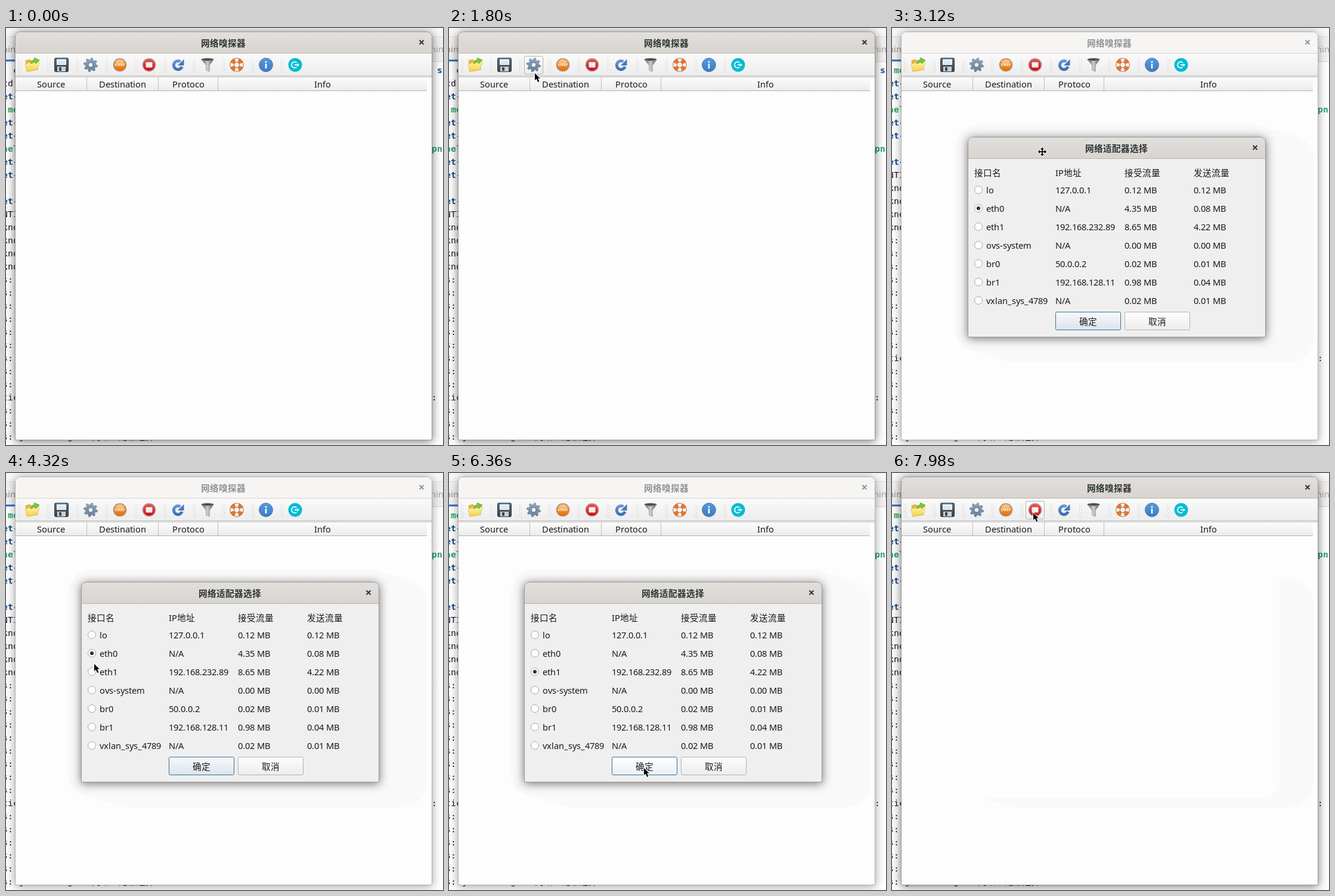
Recreate the animation shown at these times as an HTML page with a canvas. Size 733 by 701 pixels, loop 8000 ms.

```html
<!DOCTYPE html>
<html lang="zh-CN">
<head>
<meta charset="utf-8">
<title>网络嗅探器</title>
<style>
html, body { margin: 0; width: 100%; height: 100%; overflow: hidden; background: #fff; }
canvas { display: block; width: 733px; height: 701px; }
</style>
</head>
<body>
<canvas id="stage"></canvas>
<script>
const W = 733, H = 701, LOOP = 8000, STEP = 60;
const canvas = document.getElementById('stage');
const dpr = window.devicePixelRatio || 1;
canvas.width = Math.round(W * dpr);
canvas.height = Math.round(H * dpr);
const c = canvas.getContext('2d');

const UI = '14.67px "Noto Sans", "Noto Sans CJK SC", sans-serif';
const BOLD = 'bold ' + UI;
const MONO = '14.67px "DejaVu Sans Mono", "Noto Sans CJK SC", monospace';

// Moments in ms
const PRESS = 2160, OPEN = 2220, GRAB = 2940, DROP = 3300, PICK = 5340, CONFIRM = 6600, CLOSE = 6660;

// Pointer stops: time, x, y
const PATH = [
  [180, 724, 8], [360, 563, 125], [480, 459, 149], [600, 344, 152], [840, 239, 138],
  [960, 160, 146], [1140, 139, 112], [1440, 146, 42], [1800, 144, 76], [1860, 144, 76],
  [1980, 144, 65], [2280, 144, 65], [2700, 290, 215], [GRAB, 310, 225], [3060, 258, 209],
  [3120, 252, 208], [3180, 251, 208], [DROP, 251, 208], [3600, 172, 264], [3780, 145, 298],
  [4200, 146, 312], [4320, 148, 321], [4680, 143, 402], [4860, 143, 398], [5040, 143, 398],
  [5280, 144, 335], [5640, 144, 335], [6180, 350, 512], [6360, 327, 496], [CLOSE, 327, 496],
  [7380, 187, 76], [7620, 189, 66], [7800, 300, 75], [7980, 237, 67]
];

function cursorAt(t) {
  const i = PATH.findIndex(p => p[0] > t);
  if (i === 0) return null;
  if (i < 0) return PATH[PATH.length - 1].slice(1);
  const a = PATH[i - 1], b = PATH[i], k = (t - a[0]) / (b[0] - a[0]);
  return [1, 2].map(n => Math.round(a[n] + (b[n] - a[n]) * k));
}

function dialogAt(t) {
  const [x, y] = cursorAt(Math.max(GRAB, Math.min(t, DROP)));
  return [x - 125, y - 25];
}

// ---- helpers ----
function box(x, y, w, h, fill) {
  c.fillStyle = fill;
  c.fillRect(x, y, w, h);
}
function round(x, y, w, h, r, fill, line) {
  c.beginPath();
  c.roundRect(x, y, w, h, r);
  if (fill) { c.fillStyle = fill; c.fill(); }
  if (line) { c.strokeStyle = line; c.lineWidth = 1; c.stroke(); }
}
function disc(x, y, r, fill, line, width = 1) {
  c.beginPath();
  c.arc(x, y, r, 0, 7);
  if (fill) { c.fillStyle = fill; c.fill(); }
  if (line) { c.strokeStyle = line; c.lineWidth = width; c.stroke(); }
}
function oval(x, y, rx, ry, fill) {
  c.beginPath();
  c.ellipse(x, y, rx, ry, 0, 0, 7);
  c.fillStyle = fill;
  c.fill();
}
function poly(points, fill, line, width = 1) {
  c.beginPath();
  points.forEach(p => c.lineTo(p[0], p[1]));
  c.closePath();
  if (line) { c.strokeStyle = line; c.lineWidth = width; c.lineJoin = 'round'; c.stroke(); }
  if (fill) { c.fillStyle = fill; c.fill(); }
}
function fade(y0, y1, ...colors) {
  const g = c.createLinearGradient(0, y0, 0, y1);
  colors.forEach((v, i) => g.addColorStop(i / (colors.length - 1), v));
  return g;
}

// Text on whole-pixel advances, as a hinted desktop sets it
const widths = {};
function advance(ch, font) {
  return widths[font + ch] ??= Math.round(c.measureText(ch).width);
}
function text(s, x, y, color = '#1a1a1a', font = UI, centered = false) {
  c.font = font;
  c.fillStyle = color;
  if (centered) {
    let w = 0;
    for (const ch of s) w += advance(ch, font);
    x = Math.floor(x - w / 2);
  }
  for (const ch of s) {
    c.fillText(ch, x, y);
    x += advance(ch, font);
  }
}

// ---- terminal behind the window ----
const BLUE = '#12488b', GREEN = '#26a269', INK = '#171421';
const LINES = [
  ['  c', BLUE], ['cd', INK], ['et-', BLUE], [' mo', GREEN], ['et-', BLUE], ['et-', BLUE],
  ['nel', GREEN], ['et-', BLUE], ['et-', BLUE], ['', INK], ['et-', BLUE], ['NTI', INK],
  ...Array(4).fill(['kno', INK]), ...Array(9).fill(['s:', INK]), ['tic', INK],
  ...Array(6).fill(['s:', INK])
];

function terminal(scrolled) {
  box(0, 0, W, H, '#fff');
  box(0, 0, W, 15, '#f8f8f8');
  box(0, 14, W, 1, '#dcdcdc');
  box(0, 15, W, 42, '#f3f2f1');
  box(0, 56, W, 1, '#d8d4d0');
  box(0, 53, 15, 3, '#3079d6');
  text('nin', -6, 41, '#8f8f8f');
  text('nin', 712, 41, '#a5a5a5');
  c.save();
  c.beginPath();
  c.rect(0, 57, W, H - 57);
  c.clip();
  LINES.forEach(([s, color], i) => {
    const y = 76 + 22 * (i - (scrolled ? 3 : 0));
    if (y < 70 || y > H) return;
    const font = color === INK ? MONO : 'bold ' + MONO;
    text(s, -6, y, color, font);
    if (i === 0) text('s', 723, y, color, font);
    if (i === 6) text('pn', 714, y, color, font);
    if (s === 'tic') {
      text(':', 714, y, INK, font);
      text('-', 731, y, '#2aa1b3', font);
    }
  });
  text('j        g', 22, 692, INK, MONO);
  text('网络适配器选择', 144, 692, INK, MONO);
  c.restore();
}

// ---- window frame ----
function frame(x, y, w, h, title, active, body) {
  const corners = [8, 8, 0, 0];
  c.save();
  c.shadowColor = active ? 'rgba(0,0,0,.55)' : 'rgba(0,0,0,.38)';
  c.shadowBlur = 16 * dpr;
  c.shadowOffsetY = 2 * dpr;
  round(x, y, w, h, corners, body);
  c.restore();
  round(x, y, w, 37, corners, active ? fade(y, y + 36, '#e2dfdc', '#d8d4d0') : '#f6f5f4');
  box(x, y + 36, w, 1, active ? '#bdb6af' : '#d5d0cc');
  round(x + .5, y + .5, w - 1, h - 1, corners, null, active ? '#9d9a97' : '#b3b0ae');
  const ink = active ? '#2e3436' : '#929595';
  text(title, x + w / 2 - .5, y + 25, ink, BOLD, true);
  const cx = x + w - 18, cy = y + 18;
  c.strokeStyle = ink;
  c.lineWidth = 2;
  c.beginPath();
  for (const s of [-1, 1]) {
    c.moveTo(cx - 3.5, cy - 3.5 * s);
    c.lineTo(cx + 3.5, cy + 3.5 * s);
  }
  c.stroke();
}

// ---- toolbar icons, drawn around 0,0 ----
function ball(top, low, rim) {
  disc(0, 0, 11.3, rim);
  disc(0, 0, 9.8, fade(-10, 10, top, low));
}
function folder() {
  poly([[-11, -7], [-4, -9], [-2, -6], [8, -7], [9, 8], [-9, 11]], '#e2b93c', '#c79c2b');
  poly([[-12, -1], [0, -5], [12, -5], [8, 8], [-9, 11]], fade(-5, 11, '#fff2a0', '#f3cf4d'), '#d9b13a');
  poly([[-3, -2], [-1, -7], [4, -9], [3, -12], [12, -8], [6, -2], [5, -5]], '#7cc33b', '#559a25');
}
function floppy() {
  round(-11.5, -11.5, 23, 23, 2, fade(-11, 11, '#5d6b78', '#39444e'), '#2f3942');
  box(-8, -11, 16, 11, '#eef4f8');
  box(-8, -11, 16, 2, '#6f9cc4');
  for (const y of [-6, -3]) box(-6, y, 12, 1, '#c0ccd5');
  box(-7, 3, 14, 8, '#c9d1d7');
  box(-4, 4, 4, 6, '#3d4751');
}
function gear() {
  const teeth = Array.from({ length: 32 }, (_, i) => {
    const a = (i - 1.5) * Math.PI / 16, r = i % 4 < 2 ? 8.6 : 11.8;
    return [r * Math.cos(a), r * Math.sin(a)];
  });
  poly(teeth, fade(-12, 12, '#93a4bd', '#677b98'), '#697d9a', .8);
  disc(0, 0, 4, '#eef0f3', '#5e718d');
}
function start() {
  ball('#ffb057', '#e56a06', '#a9927c');
  oval(0, -5, 7, 4, 'rgba(255,255,255,.3)');
  c.font = 'bold 5.5px "Noto Sans", sans-serif';
  c.textAlign = 'center';
  c.fillStyle = '#fff';
  c.fillText('START', 0, 2);
  c.textAlign = 'left';
}
function stop() {
  ball('#f0534e', '#c80c10', '#b98f90');
  round(-5.5, -4.5, 11, 9, 1, fade(-5, 5, '#fff', '#e4e4e4'));
}
function refresh() {
  c.beginPath();
  c.arc(-.5, .5, 7.2, .35, 5.3);
  c.strokeStyle = fade(-10, 10, '#6d9fda', '#366cb0');
  c.lineWidth = 5;
  c.stroke();
  poly([[9.5, -9.5], [9.5, 1], [-1, 1]], '#4279bd');
}
function funnel() {
  const g = c.createLinearGradient(-10, 0, 10, 0);
  ['#555', '#d0d0d0', '#4b4b4b'].forEach((v, i) => g.addColorStop(i / 2, v));
  poly([[-10, -9], [10, -9], [3, 1], [3, 11], [-2, 9], [-2, 1]], g, '#666', .8);
  oval(0, -9, 11, 2.8, '#aaa');
  oval(0, -9, 10, 1.9, '#4c4c4c');
}
function lifebuoy() {
  disc(0, 0, 8, null, '#f4f1ec', 7);
  c.strokeStyle = '#e8752a';
  for (let i = 0; i < 4; i++) {
    const a = (i + .5) * Math.PI / 2;
    c.beginPath();
    c.arc(0, 0, 8, a - .45, a + .45);
    c.stroke();
  }
  disc(0, 0, 11.4, null, '#b5622f', .9);
  disc(0, 0, 4.5, null, '#9c623d', .9);
}
function info() {
  disc(0, 0, 11.5, fade(-11, 11, '#5799dc', '#3b7cc4'), '#3e76b3', .8);
  disc(0, -5, 1.6, '#fff');
  box(-1.3, -2, 2.6, 8, '#fff');
}
function leave() {
  disc(0, 0, 11.5, '#00bcd4');
  c.beginPath();
  c.arc(-1, 0, 5, .8, 5.5);
  c.strokeStyle = '#fff';
  c.lineWidth = 1.8;
  c.stroke();
  box(-1, -.9, 5, 1.8, '#fff');
  poly([[3.5, -3], [7, 0], [3.5, 3]], '#fff');
}
const ICONS = [folder, floppy, gear, start, stop, refresh, funnel, lifebuoy, info, leave];

function toolbar(hover, pressed) {
  box(16, 43, 698, 38, fade(43, 81, '#fafafa', '#ececec'));
  box(16, 80, 698, 1, '#b4b4b4');
  box(16, 81, 698, 1, '#f6f6f6');
  ICONS.forEach((icon, i) => {
    const x = 44 + 49 * i;
    for (let y = 52; y < 74; y += 4) {
      box(x - 24, y, 1, 1, '#b8b8b8');
      box(x - 21, y + 2, 1, 1, '#b8b8b8');
    }
    if (i === hover) {
      const fill = pressed ? '#d3d3d3' : fade(47, 78, '#fefefe', '#ebebeb');
      round(x - 15.5, 47.5, 31, 30, 2, fill, pressed ? '#a8a8a8' : '#b2b2b2');
    }
    c.save();
    c.translate(x, 62);
    icon();
    c.restore();
  });
}

function tableHead() {
  box(16, 82, 698, 610, '#fdfdfd');
  box(16, 82, 690, 24, fade(82, 106, '#fcfcfc', '#ebebeb'));
  box(16, 82, 698, 1, '#c4c4c4');
  box(16, 105, 690, 1, '#b0b0b0');
  const edges = [15, 135, 255, 355, 706];
  ['Source', 'Destination', 'Protoco', 'Info'].forEach((s, i) => {
    text(s, (edges[i] + edges[i + 1]) / 2 + 1, 100, '#1a1a1a', UI, true);
    if (i) box(edges[i], 83, 1, 22, '#bdbdbd');
  });
}

// Faint halo left around the places where the dialog has been
function halos(t) {
  c.save();
  c.beginPath();
  c.rect(16, 106, 698, 586);
  c.clip();
  for (let s = GRAB; s <= Math.max(GRAB, Math.min(t, DROP)); s += STEP) {
    const [x, y] = dialogAt(s);
    round(x - 22, y - 21, 544, 383, 42, '#f9f9f9');
  }
  if (t >= CLOSE) round(100, 160, 550, 386, [0, 0, 28, 0], '#fdfdfd');
  c.restore();
}

// ---- dialog ----
const COLS = [11, 147, 263, 379];
const ROWS = [
  ['lo', '127.0.0.1', '0.12', '0.12'],
  ['eth0', 'N/A', '4.35', '0.08'],
  ['eth1', '192.168.232.89', '8.65', '4.22'],
  ['ovs-system', 'N/A', '0.00', '0.00'],
  ['br0', '50.0.0.2', '0.02', '0.01'],
  ['br1', '192.168.128.11', '0.98', '0.04'],
  ['vxlan_sys_4789', 'N/A', '0.02', '0.01']
];

function button(x, y, label, main, hover, down) {
  let fill = fade(y, y + 31, '#fdfdfd', '#ededed');
  if (main) fill = hover ? fade(y, y + 31, '#ffffff', '#e9f0f7') : fade(y, y + 31, '#f8fafc', '#dbe3ec');
  if (down) fill = '#cfd6dd';
  round(x + .5, y + .5, 109, 30, 2, fill, main ? '#33719c' : '#b1b1b1');
  text(label, x + 55, y + 22, '#1a1a1a', UI, true);
}

function dialog(t, [px, py]) {
  const [x, y] = dialogAt(t);
  frame(x, y, 500, 337, '网络适配器选择', true, '#efefef');
  ['接口名', 'IP地址', '接受流量', '发送流量'].forEach((s, i) => text(s, x + COLS[i], y + 66));
  const chosen = t < PICK ? 1 : 2;
  ROWS.forEach((row, i) => {
    const by = y + 95 + 31 * i;
    disc(x + 18, by - 6, 6.5, '#fefefe', '#a6a6a6');
    if (i === chosen) disc(x + 18, by - 6, 3.1, '#333');
    row.forEach((s, n) => text(n > 1 ? s + ' MB' : s, x + (n ? COLS[n] : 31), by));
  });
  const by = y + 294;
  const over = px >= x + 147 && px < x + 257 && py >= by && py < by + 31;
  button(x + 147, by, '确定', true, over, t >= CONFIRM);
  button(x + 263, by, '取消', false);
}

// ---- pointers ----
function arrow() {
  poly([[0, 0], [0, 12], [2.8, 9.6], [5.2, 15], [7.4, 14], [5.1, 8.8], [8.8, 8.8]], '#000', '#fff', 1.8);
}
function hand() {
  poly([[-1, 0], [1.5, 0], [2, 6], [9, 8], [9, 14], [7, 18], [-1, 18], [-6, 10], [-1.5, 11]], '#000', '#fff', 1.8);
}
function mover() {
  for (const [color, grow] of [['#fff', 2], ['#000', 0]]) {
    for (let i = 0; i < 4; i++) {
      c.rotate(Math.PI / 2);
      box(0, -.9 - grow / 2, 5, 1.8 + grow, color);
      poly([[4, -3], [7, 0], [4, 3]], color, color, grow || .3);
    }
  }
}

function pointer(t, [x, y], open) {
  const inTable = !open && x > 16 && x < 706 && y > 106;
  c.save();
  c.translate(x, y);
  if (t >= GRAB && t <= DROP) mover();
  else if (inTable) hand();
  else arrow();
  c.restore();
}

function draw(t) {
  const open = t >= OPEN && t < CLOSE;
  const cursor = cursorAt(t);
  let hover = -1;
  if (cursor && (!open || t < 2340) && cursor[1] >= 47 && cursor[1] < 78)
    hover = ICONS.findIndex((_, i) => Math.abs(cursor[0] - 44 - 49 * i) <= 16);
  const pressed = (t >= PRESS && t < 2340) || (t >= 7500 && t < 7620);

  c.setTransform(dpr, 0, 0, dpr, 0, 0);
  terminal(t >= OPEN);
  frame(15, 6, 700, 687, '网络嗅探器', !open, '#fdfdfd');
  toolbar(hover, pressed);
  tableHead();
  if (t >= OPEN) halos(t);
  if (open) dialog(t, cursor);
  if (cursor) pointer(t, cursor, open);
}

function tick() {
  const t = performance.now() % LOOP;
  draw(Math.floor(t / STEP) * STEP);
  requestAnimationFrame(tick);
}
tick();
</script>
</body>
</html>
```
